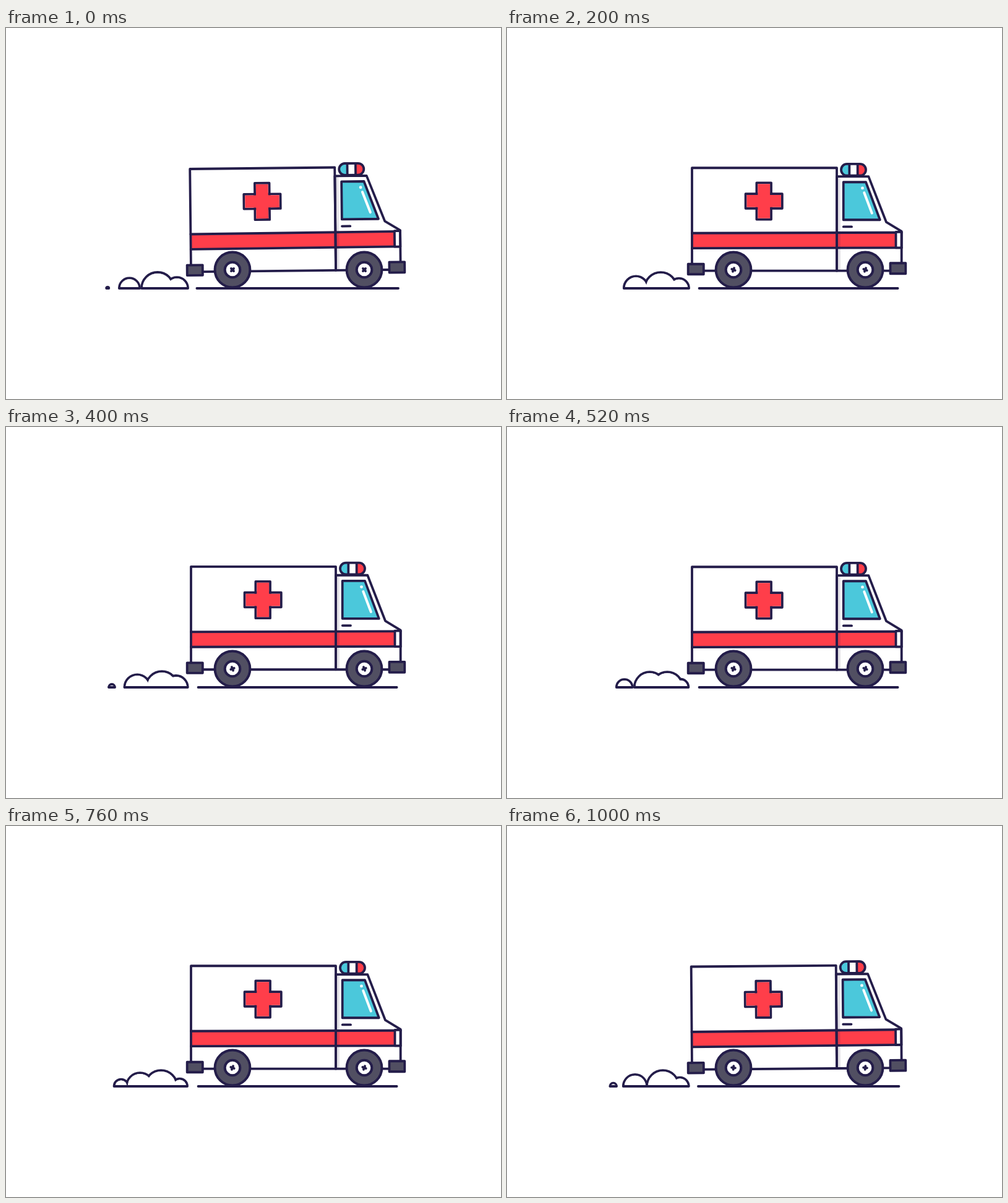
Recreate the animation shown at these times as an HTML page with a canvas. Size 800x600 px, loop 1.04 s.

```html
<!DOCTYPE html>
<html lang="en">
<head>
<meta charset="utf-8">
<title>Ambulance</title>
<style>
html, body { margin: 0; width: 100%; height: 100%; overflow: hidden; background: #fff; }
canvas { display: block; }
</style>
</head>
<body>
<canvas id="stage" width="800" height="600"></canvas>
<script>
const ctx = document.getElementById('stage').getContext('2d');
const INK = '#241d4a', RED = '#ff3e4a', CYAN = '#4bc8db', GREY = '#514f62', WHITE = '#fff';
const STEP = 40, FRAMES = 26, GROUND = 421, LINE = 3.8;
const PUFF_BIRTHS = [0, 5.5, 9.6, 14.3, 20.5];

function paint(fill, width = LINE, color = INK) {
  if (fill) { ctx.fillStyle = fill; ctx.fill(); }
  if (width) { ctx.lineWidth = width; ctx.strokeStyle = color; ctx.stroke(); }
}

function poly(points, fill, width) {
  ctx.beginPath();
  points.forEach(([x, y]) => ctx.lineTo(x, y));
  ctx.closePath();
  paint(fill, width);
}

function box(x0, y0, x1, y1, fill, width) {
  poly([[x0, y0], [x1, y0], [x1, y1], [x0, y1]], fill, width);
}

function line(x0, y0, x1, y1, width, color) {
  ctx.beginPath();
  ctx.moveTo(x0, y0);
  ctx.lineTo(x1, y1);
  paint(null, width, color);
}

function disc(x, y, r, fill, width) {
  ctx.beginPath();
  ctx.arc(x, y, r, 0, Math.PI * 2);
  paint(fill, width);
}

// A puff drifts off with growing speed while it swells and shrinks
function puffAt(frame, birth) {
  const start = -3.9, end = 17;
  const age = (frame - birth - start + FRAMES) % FRAMES + start;
  const life = Math.min(1, (age - start) / (end - start));
  return {
    x: 286 - 15 * Math.log(1 + Math.exp((age - 0.17) / 2)),
    r: 26 * Math.sin(Math.PI * life ** 0.85)
  };
}

function smoke(frame) {
  const puffs = PUFF_BIRTHS.map(b => puffAt(frame, b)).filter(p => p.r > 1);
  ctx.save();
  ctx.beginPath();
  ctx.rect(0, 0, 800, GROUND);
  ctx.clip();
  puffs.forEach(({ x, r }) => disc(x, GROUND, r, null));
  puffs.forEach(({ x, r }) => disc(x, GROUND, Math.max(0, r - LINE / 2), WHITE, 0));
  ctx.restore();
  ctx.beginPath();
  puffs.forEach(({ x, r }) => {
    ctx.moveTo(x - r, GROUND);
    ctx.lineTo(x + r, GROUND);
  });
  paint(null);
}

function cross(x, y, long, short) {
  const bars = [[long, short], [short, long]];
  const inset = LINE / 2;
  bars.forEach(([w, h]) => box(x - w, y - h, x + w, y + h, null));
  bars.forEach(([w, h]) => box(x - w + inset, y - h + inset, x + w - inset, y + h - inset, RED, 0));
}

function siren() {
  const left = 540, top = 219, w = 40, h = 18.8;
  ctx.beginPath();
  ctx.roundRect(left, top, w, h, h / 2);
  ctx.save();
  ctx.clip();
  [CYAN, WHITE, RED].forEach((color, i) => {
    const x = left + i * w / 3;
    box(x, top, x + w / 3, top + h, color, 0);
  });
  [1, 2].forEach(i => line(left + i * w / 3, top, left + i * w / 3, top + h));
  ctx.restore();
  ctx.beginPath();
  ctx.roundRect(left, top, w, h, h / 2);
  paint(null);
}

function body() {
  const back = 299, split = 533, front = 637.7, roof = 225.3, floor = 391.7;
  const cab = [[split, 239.2], [584.3, 239.2], [613, 313], [front, 328], [front, floor], [split, floor]];
  siren();
  poly(cab, WHITE, 0);
  box(back, roof, split, floor, WHITE, 0);
  box(split, 240, 539, floor, '#e4e2e7', 0);

  box(back, 330.8, front, 355, RED, 0);
  box(split, 331, 539, 355, '#e2384a', 0);
  line(back, 330.8, front, 329.8);
  line(back, 355.2, front, 354.4);
  box(628.5, 329, front, 354.5, WHITE);

  poly(cab, null);
  box(back, roof, split, floor, null);
  cross(415.2, 279, 29.6, 11.8);

  // Window with its glint, and the door handle
  poly([[543.7, 248.3], [580, 248.3], [602.8, 309.3], [543.7, 309.3]], CYAN);
  disc(574.5, 258, 2.4, WHITE, 0);
  line(577.3, 265.5, 589.8, 298.5, 4, WHITE);
  line(543.8, 320.5, 557, 320.5);

  box(292.7, 380.8, 317.8, 397.3, GREY);
  box(619.5, 379.3, 644.3, 396.3, GREY);
}

function wheel(x, angle) {
  disc(x, 391, 28.4, GREY, 4);
  disc(x, 391, 12.3, WHITE, 4);
  ctx.save();
  ctx.translate(x, 391);
  ctx.rotate(angle);
  line(-2.9, 0, 2.9, 0, 3.8);
  line(0, -2.9, 0, 2.9, 3.8);
  ctx.restore();
}

function draw(frame) {
  const near = Math.min(frame, FRAMES - frame, 3);
  const tilt = Math.cos(near * Math.PI / 6) ** 2;
  const bounce = 0.55 * (1 - Math.cos(frame * Math.PI / 4));
  const spin = (frame + 1.5 - tilt / 2) * Math.PI / 4;

  ctx.fillStyle = WHITE;
  ctx.fillRect(0, 0, 800, 600);
  ctx.lineCap = ctx.lineJoin = 'round';
  smoke(frame);
  line(310.6 - 2.2 * tilt, GROUND, 631.6 + 2.4 * tilt, GROUND);

  ctx.save();
  ctx.translate(550, 388 + bounce);
  ctx.rotate(-0.0108 * tilt);
  ctx.translate(-550, -388);
  body();
  ctx.restore();

  wheel(366, spin);
  wheel(579, spin);
}

const start = performance.now();
function tick() {
  draw(Math.floor((performance.now() - start) / STEP) % FRAMES);
  requestAnimationFrame(tick);
}
tick();
</script>
</body>
</html>
```
